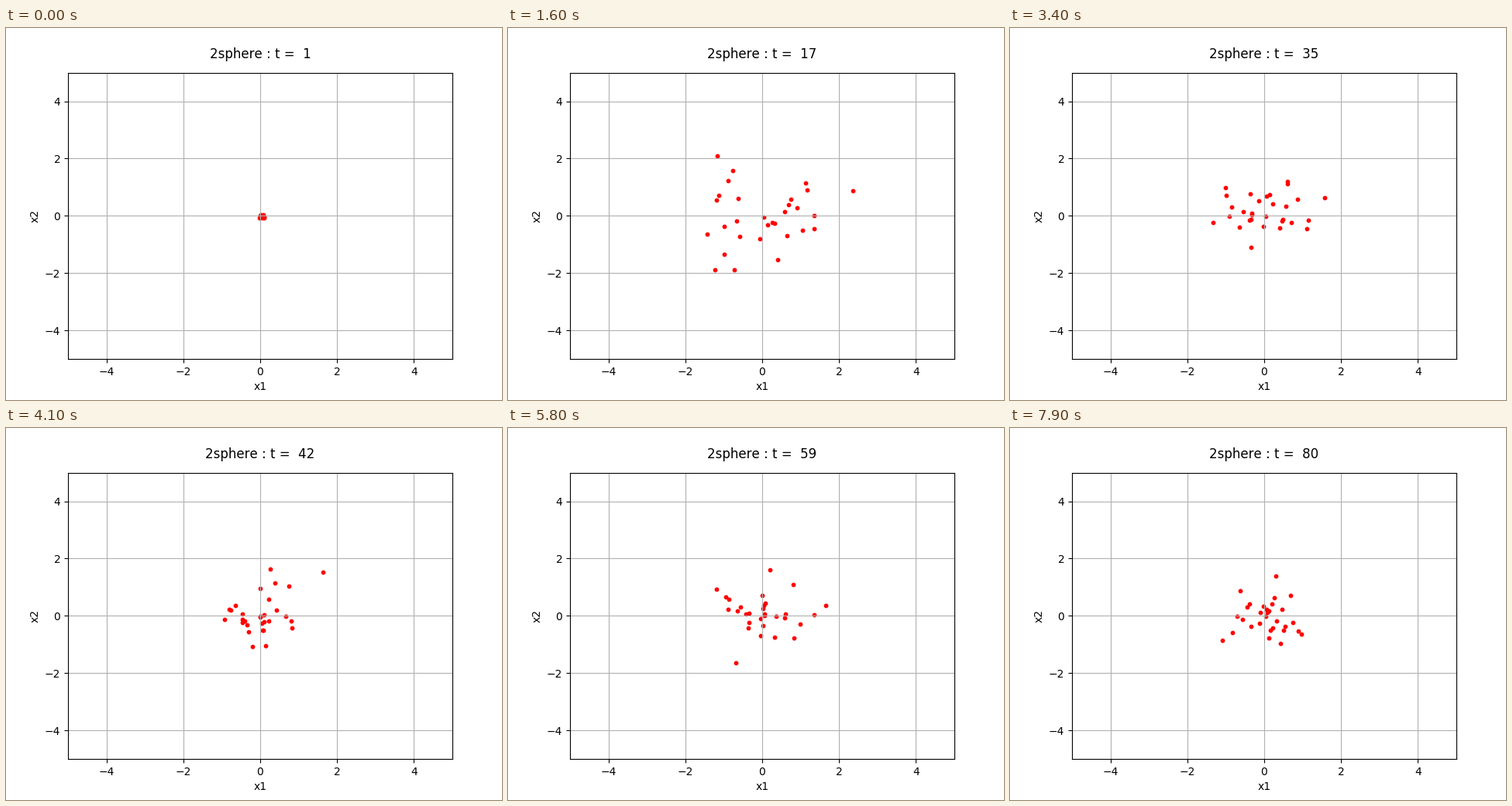
A matplotlib script for the animation above (8 s loop, 640 px wide and 480 px high).

```python
import numpy as np
import matplotlib.pyplot as plt
from matplotlib.animation import FuncAnimation

FRAMES, INTERVAL = 80, 100
PARTICLES, MODES = 30, 12
OPTIMUM = 0.03, -0.02


def swarm_size(t):
    """Typical distance from the optimum: a burst, then slow contraction."""
    burst = 1 - np.exp(-(t - 1) / 2)
    return 0.03 + burst * (0.52 + 1.6 * np.exp(-t / 15))


def simulate(seed=4):
    """Each particle swings about the optimum as a sum of random waves."""
    rng = np.random.default_rng(seed)
    shape = (MODES, PARTICLES, 2)
    rate = rng.normal(0.65, 0.22, shape)
    phase = rng.uniform(0, 2 * np.pi, shape)
    reach = rng.uniform(0.5, 1.4, (PARTICLES, 1))
    reach[0] = 0.03  # the leader barely moves

    def pose(t):
        swing = np.cos(rate * t + phase).sum(axis=0) * np.sqrt(2 / MODES)
        return OPTIMUM + np.clip(swing * reach, -2.8, 2.8) * swarm_size(t)

    return [pose(t) for t in range(1, FRAMES + 1)]


paths = simulate()

# Whole-pixel kerning, as in older matplotlib text layout
plt.rcParams["text.kerning_factor"] = 6

fig, ax = plt.subplots(figsize=(6.4, 4.8), dpi=100)
ax.set(xlim=(-5, 5), ylim=(-5, 5), xlabel="x1", ylabel="x2")
ax.grid(True)
dots = ax.scatter(*paths[0].T, s=10, c="red")
title = ax.text(0.5, 1.05, "", transform=ax.transAxes, ha="center",
                fontsize=12)


def update(i):
    dots.set_offsets(paths[i])
    title.set_text(f"2sphere : t =  {i + 1}")
    return dots, title


anim = FuncAnimation(fig, update, frames=FRAMES, interval=INTERVAL,
                     repeat=True, repeat_delay=0)
plt.show()
```
